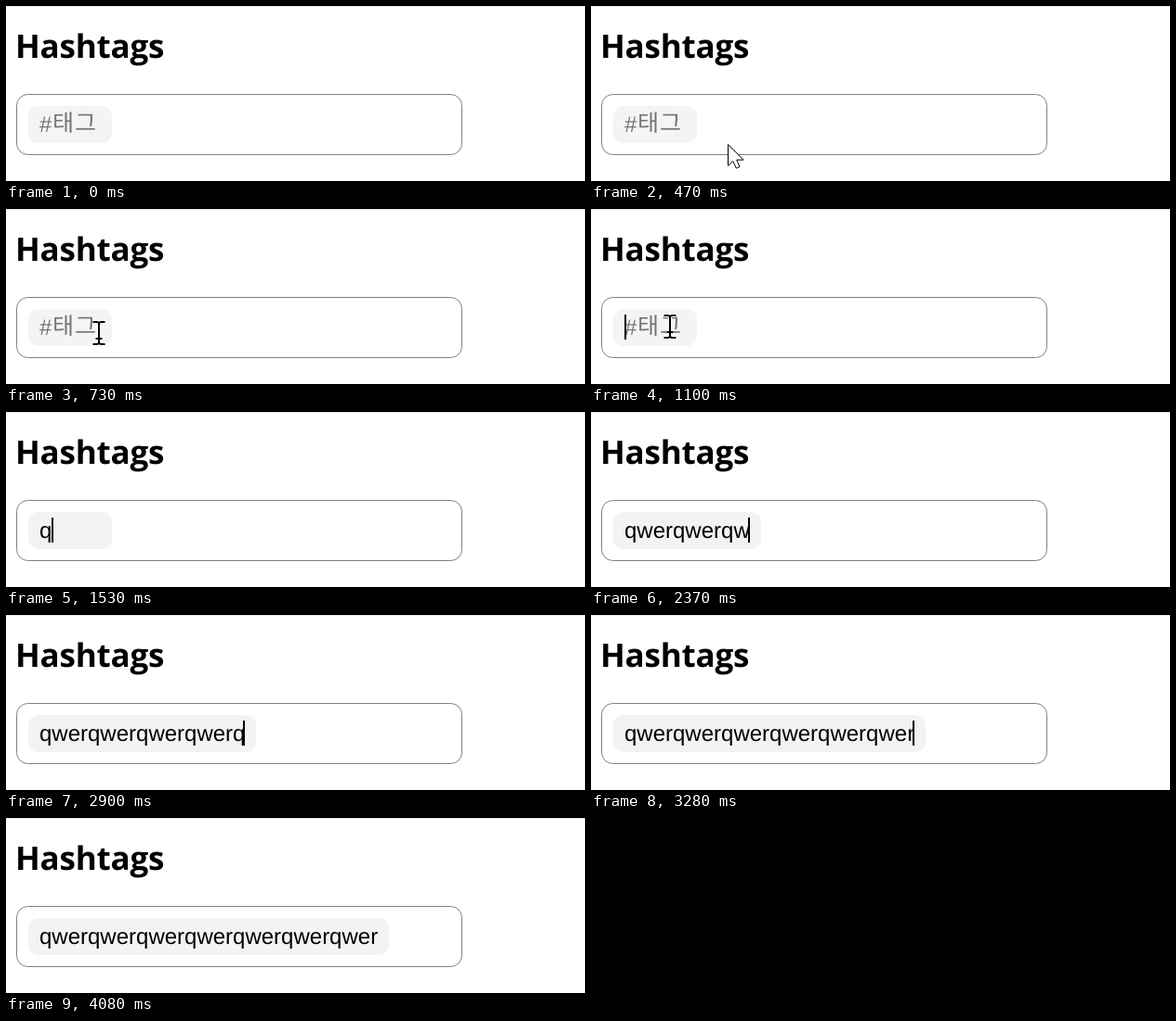
Animation of 623 by 189 pixels, one loop 4.49 s. Source, as an HTML page:

```html
<!DOCTYPE html>
<html lang="en">
<head>
<meta charset="utf-8">
<title>Hashtags</title>
<style>
  html, body { margin: 0; width: 100%; height: 100%; overflow: hidden; background: #fff; }
  svg { display: block; width: 623px; height: 189px; }
  text { white-space: pre; text-rendering: geometricPrecision; }
  .title { font: 700 35px "Open Sans", "Noto Sans", sans-serif; letter-spacing: -.2px; }
  .field { font: 24px "Liberation Sans", Arial, sans-serif; }
  .hint { fill: #757575; }
  .hangul { font: 300 25px "Noto Sans CJK KR", "Noto Sans CJK", "Noto Sans CJK JP", sans-serif; }
</style>
</head>
<body>
<svg viewBox="0 0 623 189">
  <rect width="623" height="1" fill="#f0f0f0"/>
  <text class="title" x="10" y="56">Hashtags</text>
  <rect x="11.5" y="95.5" width="479" height="65" rx="12" fill="#fff" stroke="#808080"/>
  <rect id="chip" x="24" y="108" width="90" height="40" rx="11"/>
  <g id="hint" class="hint">
    <text class="field" x="36" y="136">#</text>
    <text class="hangul" x="50" y="135">태</text>
    <text class="hangul" x="74" y="135">그</text>
  </g>
  <text id="typed" class="field" x="36" y="136"></text>
  <rect id="caret" y="114" width="2" height="27"/>
  <path id="arrow" d="M.5 .5V23.5L5.8 18.6L9.3 26.2L13 24.6L9.7 17.2H17Z" fill="#fff" stroke="#000"/>
  <g id="beam" fill="none">
    <path d="M-6.5-12H-2L0-11L2-12H6.5M0-11V11M-6.5 12H-2L0 11L2 12H6.5M-3.5 6H3.5" stroke="#fff" stroke-width="4"/>
    <path d="M-6.5-12H-2L0-11L2-12H6.5M0-11V11M-6.5 12H-2L0 11L2 12H6.5M-3.5 6H3.5" stroke="#000" stroke-width="2"/>
  </g>
</svg>
<script>
  const LOOP = 4490, ENTER = 190, OVER_TEXT = 700, FOCUS = 1000, BLINK = 4080;
  const LEFT = 36, MIN_WIDTH = 66, PAD = 12;
  const WORD = "qwer";
  const ADVANCE = { q: 13.35, w: 17.33, e: 13.35, r: 7.99 };

  // First and last key time of each typed word
  const BURSTS = [[1530, 1740], [1930, 2040], [2250, 2440], [2620, 2720],
                  [2900, 3010], [3160, 3280], [3440, 3560]];
  const KEYS = BURSTS.flatMap(([a, b]) =>
    [0, 1, 2, 3].map(i => Math.round((a + (b - a) * i / 3) / 10) * 10));

  // Pointer hot spot: time, x, y
  const PATH = [[190, 338, 187], [330, 218, 167], [470, 147, 149], [600, 113, 141],
                [700, 102, 137], [860, 89, 121], [1000, 85, 126], [1100, 85, 127]];

  const el = id => document.getElementById(id);
  const [chip, hint, typed, caret, arrow, beam] =
    ["chip", "hint", "typed", "caret", "arrow", "beam"].map(el);
  const show = (node, on) => node.setAttribute("visibility", on ? "visible" : "hidden");

  function pointerAt(t) {
    const i = PATH.findIndex(p => p[0] > t);
    if (i < 0) return PATH[PATH.length - 1].slice(1);
    if (i === 0) return PATH[0].slice(1);
    const a = PATH[i - 1], b = PATH[i];
    const k = (t - a[0]) / (b[0] - a[0]);
    return [1, 2].map(n => Math.round(a[n] + (b[n] - a[n]) * k));
  }

  function draw(t) {
    const count = KEYS.filter(k => k <= t).length;
    const value = WORD.repeat(BURSTS.length).slice(0, count);
    const textWidth = [...value].reduce((sum, c) => sum + ADVANCE[c], 0);
    const width = Math.max(MIN_WIDTH, Math.round(textWidth));

    typed.textContent = value;
    show(hint, !count);
    chip.setAttribute("width", width + 2 * PAD);
    chip.setAttribute("fill", count ? "#f3f3f3" : "#f3f4f6");
    caret.setAttribute("x", LEFT + Math.min(Math.round(textWidth), width - 2));
    show(caret, t >= FOCUS && t < BLINK);

    const at = `translate(${pointerAt(Math.floor(t / 10) * 10)})`;
    arrow.setAttribute("transform", at);
    beam.setAttribute("transform", at);
    show(arrow, t >= ENTER && t < OVER_TEXT);
    show(beam, t >= OVER_TEXT && !count);
  }

  const start = performance.now();
  function tick() {
    draw((performance.now() - start) % LOOP);
    requestAnimationFrame(tick);
  }
  tick();
</script>
</body>
</html>
```
